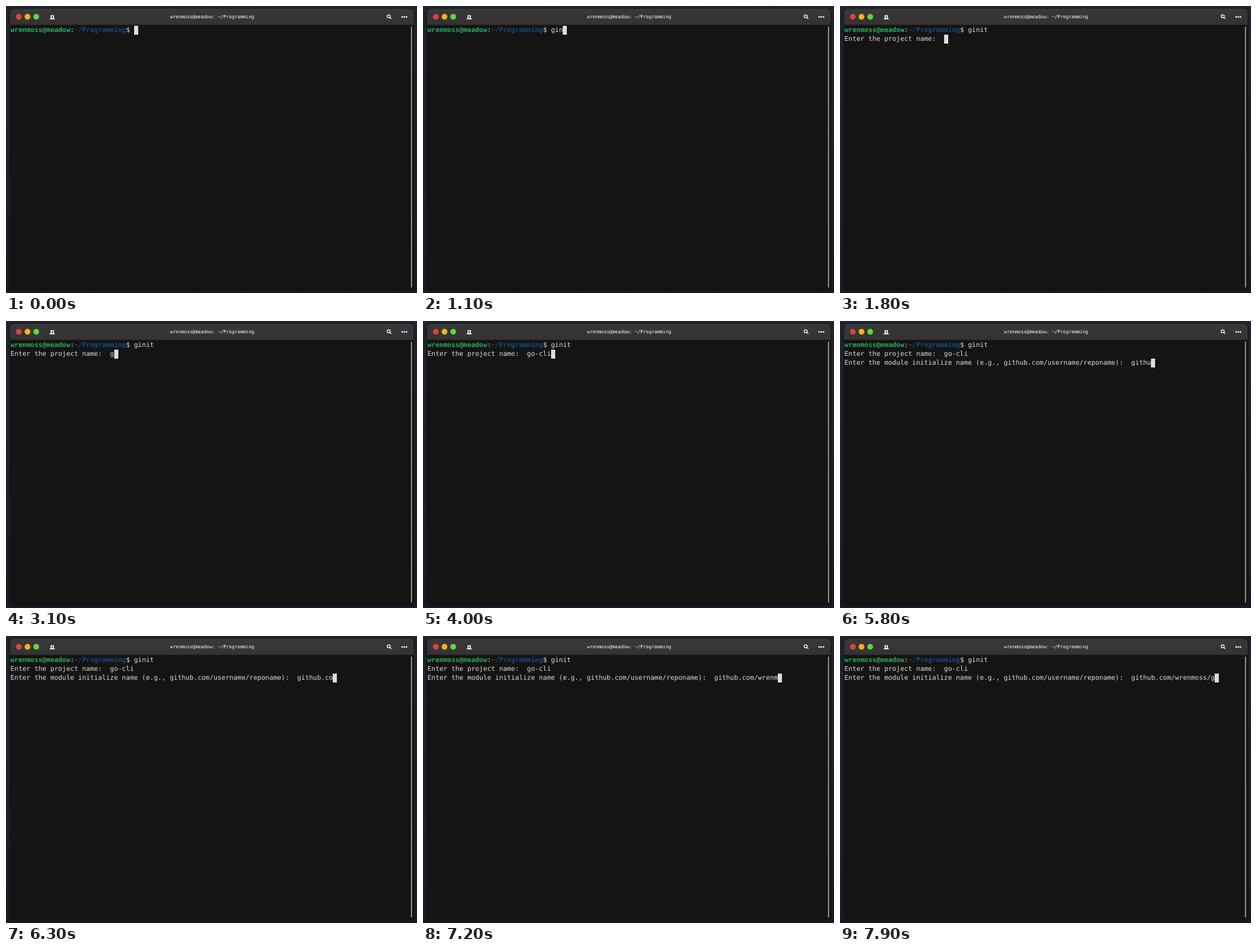
Animation, 600 px wide and 420 px high, one loop 8 s. Source, as an HTML page:

```html
<!DOCTYPE html>
<html lang="en">
<head>
<meta charset="utf-8">
<title>Terminal</title>
<style>
  html, body { margin: 0; width: 100%; height: 100%; overflow: hidden; background: #1f212c; }
  .stage {
    position: relative; width: 600px; height: 420px; overflow: hidden;
    background: linear-gradient(#22242f, #1e202b 70%, #191b24);
    font-family: "DejaVu Sans Mono", monospace;
    text-rendering: geometricPrecision;
  }
  .window {
    position: absolute; left: 6px; top: 4px; width: 589px; height: 410px;
    border-radius: 6px 6px 3px 3px; overflow: hidden;
    background: linear-gradient(90deg, #141416, #141412 40px);
    box-shadow: 0 1px 4px rgba(0, 0, 0, .6);
  }
  .bar {
    height: 24px; box-sizing: border-box;
    background: linear-gradient(#3a3738, #353233);
    border-bottom: 1px solid #282626;
  }
  .title {
    position: absolute; left: 1px; top: 10px; width: 600px;
    font-size: 6.8px; line-height: 12px; text-align: center; color: #fff;
  }
  .icons { position: absolute; left: 0; top: 0; }
  .scroll {
    position: absolute; left: 590.5px; top: 30px; width: 2.5px; height: 382px;
    border-radius: 2px; background: #85827d;
  }
  .screen {
    position: absolute; left: 6.5px; top: 29px;
    font-size: 9.677px; line-height: 13px; color: #dddcd8;
  }
  .row { height: 13px; white-space: pre; }
  .user { color: #2aae62; font-weight: bold; }
  .path { color: #164a86; font-weight: bold; }
  .cursor { display: inline-block; height: 13px; background: #deddda; }
</style>
</head>
<body>
<div class="stage">
  <div class="window"><div class="bar"></div></div>
  <div class="title">wrenmoss@meadow: ~/Programming</div>
  <svg class="icons" width="600" height="30" fill="#f0efee">
    <circle cx="18.7" cy="15.8" r="4.2" fill="#da433f"/>
    <circle cx="31.4" cy="15.8" r="4.2" fill="#efb11f"/>
    <circle cx="44.1" cy="15.8" r="4.2" fill="#5bdb35"/>
    <path d="M65 13.5h5v4.7h1.3v1.3h-7.6v-1.3H65z"/>
    <path d="M67.5 14.7v3M66 16.2h3" stroke="#383536" stroke-width=".9"/>
    <g fill="none" stroke="#f0efee" stroke-width="1.3">
      <circle cx="558.7" cy="15" r="2.2"/>
      <path d="M560.3 16.6l2.2 2.2"/>
    </g>
    <circle cx="578.4" cy="16" r="1.2"/>
    <circle cx="581.5" cy="16" r="1.2"/>
    <circle cx="584.6" cy="16" r="1.2"/>
  </svg>
  <div class="screen">
    <div class="row"><span class="user">wrenmoss@meadow</span>:<span class="path">~/Programming</span>$ <span class="typed"></span></div>
    <div class="row">Enter the project name:  <span class="typed"></span></div>
    <div class="row">Enter the module initialize name (e.g., github.com/username/reponame):  <span class="typed"></span></div>
  </div>
  <div class="scroll"></div>
</div>
<script>
  const LOOP = 8000, BLINK = 600;

  // start: when the row appears; keys: when each character is typed (both in ms)
  const lines = [
    { start: -200, text: 'ginit', keys: [800, 1000, 1100, 1200, 1300] },
    { start: 1600, text: 'go-cli', keys: [3100, 3300, 3400, 3600, 3800, 4000] },
    { start: 4300, text: 'github.com/wrenmoss/g', keys: [
      5400, 5500, 5600, 5600, 5800, 5900,
      6100, 6200, 6300, 6400, 6600,
      6800, 6900, 7000, 7100, 7200, 7300, 7300, 7500,
      7700, 7900] },
  ];
  const rows = [...document.querySelectorAll('.row')];
  const typed = [...document.querySelectorAll('.typed')];
  const cursor = document.createElement('span');
  cursor.className = 'cursor';
  cursor.textContent = ' ';

  function draw(t) {
    let active = 0, lastInput = 0;
    lines.forEach(({ start, text, keys }, i) => {
      const visible = t >= start;
      const pressed = keys.filter(key => key <= t);
      rows[i].style.visibility = visible ? 'visible' : 'hidden';
      typed[i].textContent = text.slice(0, pressed.length);
      if (visible) {
        active = i;
        lastInput = pressed.length ? pressed[pressed.length - 1] : start;
      }
    });
    const lit = Math.floor((t - lastInput) / BLINK) % 2 === 0;
    cursor.style.visibility = lit ? 'visible' : 'hidden';
    if (cursor.parentNode !== rows[active]) rows[active].append(cursor);
  }

  const origin = performance.now();
  function tick() {
    draw((performance.now() - origin) % LOOP);
    requestAnimationFrame(tick);
  }
  draw(0);
  requestAnimationFrame(tick);
</script>
</body>
</html>
```
